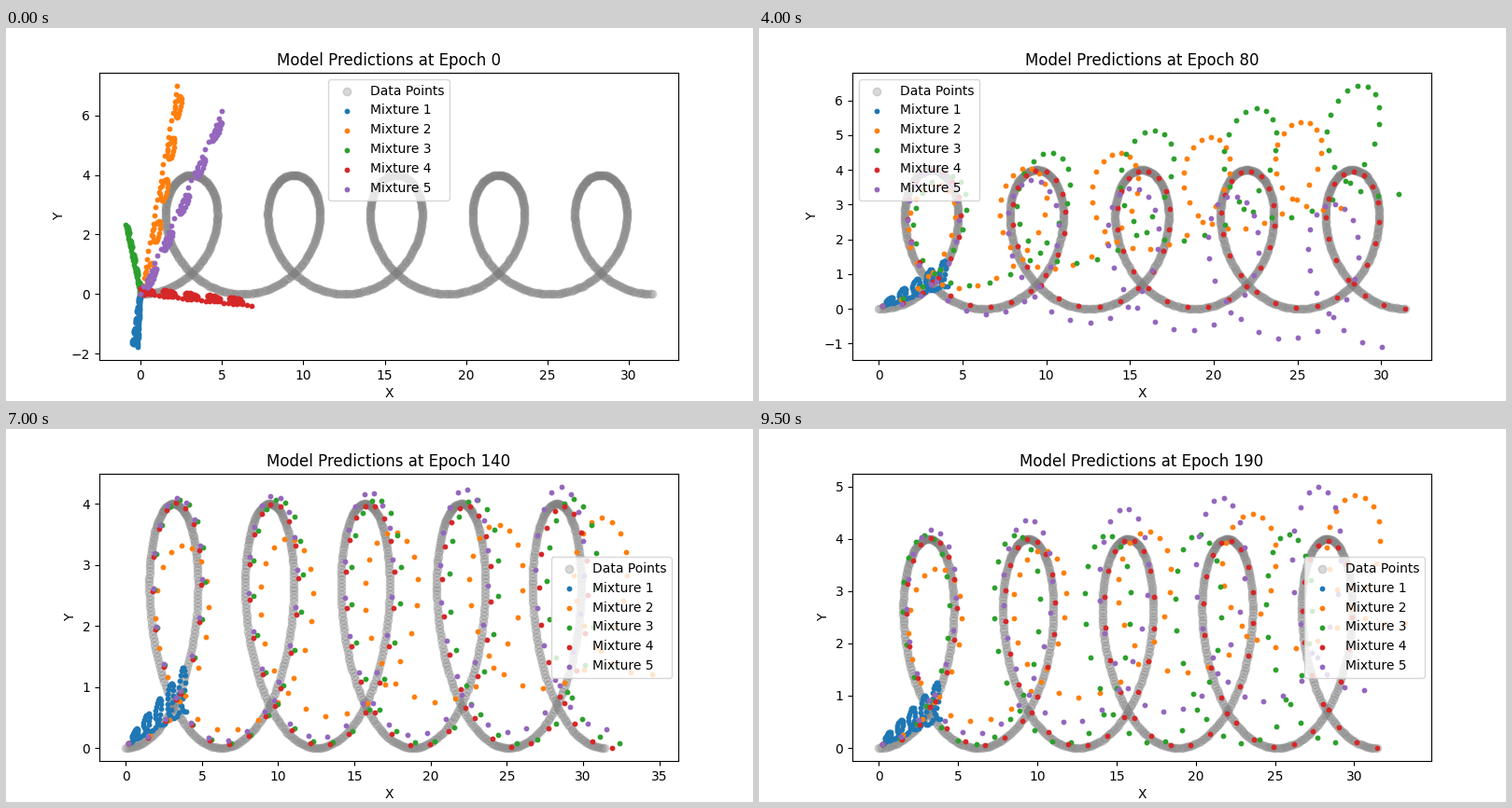
A matplotlib script for the animation above (10000 ms loop, 800 by 400 pixels).

```python
import numpy as np
import matplotlib.pyplot as plt
from matplotlib.animation import FuncAnimation

FRAMES, STEP = 20, 10
SPAN = 10 * np.pi


def cycloid(n):
    t = np.linspace(0, SPAN, n)
    return t + 3 * np.sin(t), 2 - 2 * np.cos(t)


def glide(keys, epoch):
    """Blend key points {epoch: (x, y)}; training moves fastest at first."""
    when = np.sqrt(20 * epoch) if epoch < 20 else epoch
    points = np.array(list(keys.values()))
    return np.array([np.interp(when, list(keys), axis) for axis in points.T])


class Mixture:
    """A linear image of the curve: where it ends, how its loops rise."""

    def __init__(self, end, loop, growth=0):
        self.end, self.loop, self.growth = end, loop, growth

    def predict(self, x, y, epoch):
        start = np.array([0.2, 0.07]) * min(epoch / 20, 1)
        u, v = x[:, None] / SPAN, y[:, None] / 4
        base = start + u * (glide(self.end, epoch) - start)
        rise = glide(self.loop, epoch) * (1 + self.growth * (u - 0.5))
        return (base + v * rise).T


MIXTURES = [
    Mixture(end={0: (-0.15, -1.78), 20: (4.2, 0.7), 190: (3.9, 0.55)},
            loop={0: (-0.22, 0), 20: (0.12, 0.5), 190: (0.05, 0.45)},
            growth=1.6),
    Mixture(end={0: (2.25, 7), 20: (28, -0.16), 50: (25.4, 3.53),
                 80: (27.6, 2.9), 120: (31.55, 1.04), 150: (36, 1.3),
                 190: (33.2, 2.4)},
            loop={0: (0.5, 0), 20: (0.6, 3.15), 120: (0.1, 2.9)},
            growth=-0.2),
    Mixture(end={0: (-0.9, 2.33), 20: (22.85, 0.03), 50: (24.7, 1.92),
                 80: (31.05, 3.3), 120: (31.3, 1), 150: (32.9, -0.38),
                 190: (28.8, 0.1)},
            loop={0: (0.08, 0.07), 20: (0.95, 2.6), 120: (0.3, 4),
                  190: (-0.1, 4)}),
    Mixture(end={0: (6.85, -0.4), 20: (SPAN, 0), 120: (SPAN, 0),
                 150: (32.1, 0), 190: (SPAN, 0)},
            loop={0: (-0.46, 0.24), 20: (0, 3.95)}),
    Mixture(end={0: (5, 6.15), 20: (32.5, 0.86), 50: (31.2, 0.09),
                 80: (30.05, -1.1), 120: (31.4, 0.1), 150: (31.6, 0.4),
                 190: (30.6, 1.1)},
            loop={0: (0.3, -0.1), 20: (0.1, 3.7), 50: (0.1, 4)}),
]

DATA = cycloid(1000)
INPUTS = cycloid(100)

fig, ax = plt.subplots(figsize=(8, 4), dpi=100)


def update(frame):
    epoch = frame * STEP
    ax.clear()
    ax.scatter(*DATA, color="gray", alpha=0.3, label="Data Points")
    for k, mixture in enumerate(MIXTURES):
        ax.scatter(*mixture.predict(*INPUTS, epoch), s=10, color=f"C{k}",
                   label=f"Mixture {k + 1}")
    ax.set_title(f"Model Predictions at Epoch {epoch}")
    ax.set_xlabel("X")
    ax.set_ylabel("Y")
    ax.legend(loc="best")


anim = FuncAnimation(fig, update, frames=FRAMES, interval=500,
                     repeat=True, repeat_delay=0)
plt.show()
```
